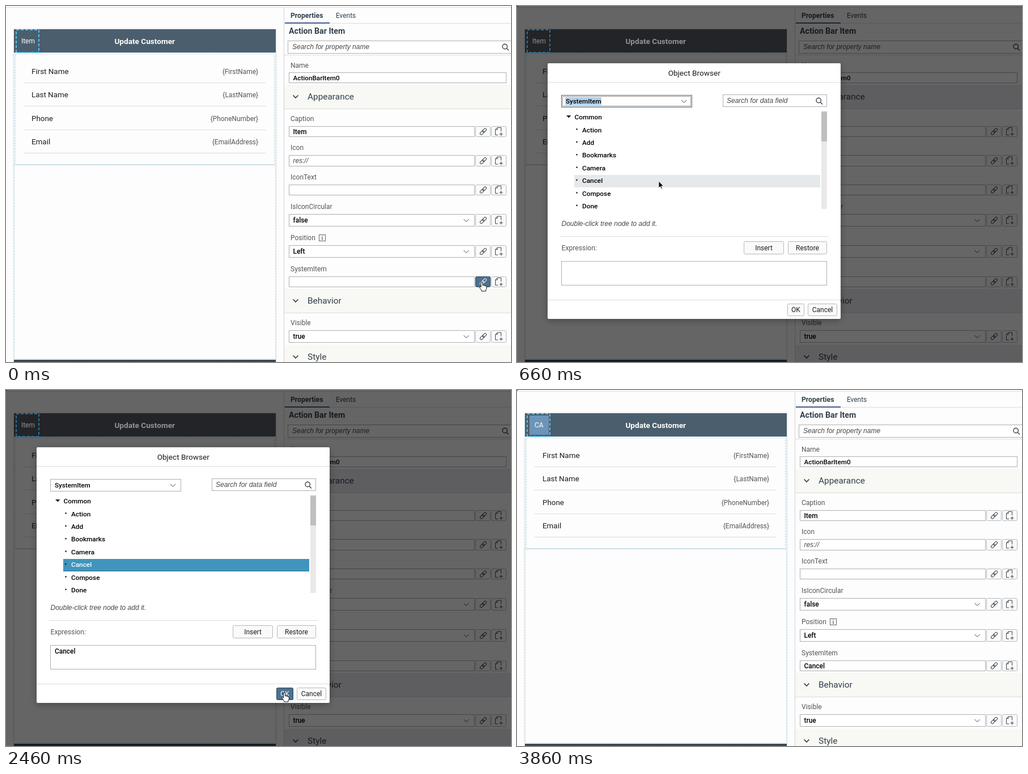
Write an HTML page that moves like this. It is 891 by 628 pixels and loops after 4.26 s.

```html
<!DOCTYPE html>
<html lang="en">
<head>
<meta charset="utf-8">
<title>Object Browser</title>
<style>
  html, body { margin: 0; width: 100%; height: 100%; overflow: hidden; background: #fdfdfd; }
  svg { display: block; width: 100%; height: 100%; }
  text { font-family: Roboto, "Open Sans", sans-serif; font-size: 12px; fill: #1c1c1c; white-space: pre; }
  .label { fill: #555; }
  .value { fill: #000; font-weight: 500; }
  .title { fill: #32404b; }
  .strong { font-weight: 700; }
  .hint { font-family: "Liberation Sans", Arial, sans-serif; font-style: italic; fill: #484848; }
  .middle { text-anchor: middle; }
  .end { text-anchor: end; }
  .field { fill: #fff; stroke: #adafb1; }
  .button { fill: #fafafa; stroke: #b5b8bb; }
  .line { stroke: #dcdcdc; }
  .icon { fill: none; stroke: #3b444c; }
  .band { fill: #f8f8f4; }
  .guide { fill: none; stroke: #b7d8e5; stroke-dasharray: 3 2; }
  .bar { fill: #4a5e6d; }
  .white { fill: #fff; }
  .badge { fill: #6d94b9; }
  .marquee { fill: none; stroke: #4fc0ee; stroke-width: 2; stroke-dasharray: 5 3; }
  .dotted { fill: none; stroke: #222; stroke-dasharray: 1 1; }
  .pressed { fill: #4d7190; stroke: #2c4456; }
  .focus { fill: none; stroke: #4a6a86; }
  .dim .band { fill: #ececf0; }
  .dim .bar { fill: #232427; }
  .dim .header .white { fill: #929294; }
  .dim .badge { fill: #27427c; }
  .dim .marquee { stroke: #2a6f9a; }
</style>
</head>
<body>
<svg id="stage" viewBox="0 0 891 628" preserveAspectRatio="none">
  <defs>
    <filter id="shadow" x="-10%" y="-10%" width="120%" height="120%">
      <feDropShadow dx="0" dy="3" stdDeviation="6" flood-opacity=".3"/>
    </filter>
    <filter id="soft" x="-5%" y="-5%" width="110%" height="110%">
      <feDropShadow dx="0" dy="0" stdDeviation="1.5" flood-opacity=".2"/>
    </filter>
    <g id="link" transform="rotate(-45)">
      <rect x="-7" y="-2.2" width="8" height="4.4" rx="2.2"/>
      <rect x="-1" y="-2.2" width="8" height="4.4" rx="2.2"/>
    </g>
    <path id="page" d="M-1 6.5H-5.5V-3L-2-6.5H4.5V0M-5.5-3H-2V-6.5M4.5 2V8M1.5 5H7.5"/>
    <path id="down" d="M-4.5-2L0 2.5 4.5-2"/>
    <path id="glass" d="M3.4-1A4.2 4.2 0 1 1-5-1 4.2 4.2 0 0 1 3.4-1ZM2.2 2.2L6 6"/>
  </defs>
</svg>
<script>
const LOOP = 4260;
const stage = document.getElementById('stage');

const rect = (x, y, w, h, attrs = '') => `<rect x="${x}" y="${y}" width="${w}" height="${h}" ${attrs}/>`;
const text = (x, y, s, size = 12, cls = '') => `<text x="${x}" y="${y}" style="font-size:${size}px" class="${cls}">${s}</text>`;
const line = (x1, y1, x2, y2, attrs = 'class="line"') => `<path d="M${x1} ${y1}L${x2} ${y2}" ${attrs}/>`;
const icon = (name, x, y, style = '') => `<g class="icon" transform="translate(${x} ${y})" style="${style}"><use href="#${name}"/></g>`;
const group = (id, body) => `<g id="${id}">${body}</g>`;
const button = (x, y, w, h, label = '') =>
  rect(x, y, w, h, 'rx="2" class="button"') + text(x + w / 2, y + h / 2 + 4.2, label, 12, 'middle');

function preview() {
  const rows = [['First Name', 'FirstName'], ['Last Name', 'LastName'], ['Phone', 'PhoneNumber'], ['Email', 'EmailAddress']];
  return rect(14, 41, 462, 600, 'fill="#fdfdfd" filter="url(#soft)"') +
    rect(14.5, 82.5, 461, 540, 'class="guide"') +
    rect(16.5, 84.5, 457, 195, 'class="guide"') +
    line(14, 280.5, 475, 280.5, 'stroke="#c9d6da"') +
    rows.map(([label, value], i) => {
      const y = 120 + i * 41.4;
      const rule = Math.round(y + 15) + .5;
      return text(45, y, label, 13.4) +
        text(445, y - .2, `{${value}}`, 11.9, 'label end') +
        line(31, rule, 458, rule);
    }).join('') +
    rect(14, 624, 462, 4, 'fill="#3a4855"');
}

function section(title, y, h) {
  return rect(491, y, 400, h, 'class="band"') + line(491, y + h + .5, 891, y + h + .5) +
    icon('down', 511, y + 20.5, 'stroke:#2f4351;stroke-width:1.7') +
    text(532, y + 26, title, 15.4, 'title');
}

function property(label, top, h, value, isList) {
  const mid = top + h / 2;
  return text(502, top - 8.8, label, 12, 'label') +
    rect(499.5, top + .5, 327, h - 1, 'class="field"') +
    text(506.5, mid + 4.2, value, 11.9, value === 'res://' ? 'hint' : 'value') +
    (isList ? icon('down', 812, mid) : '') +
    button(828.5, top + .5, 26, h - 1) + icon('link', 842, mid) +
    button(856.5, top + .5, 26, h - 1) + icon('page', 869, mid - .5);
}

function inspector() {
  return rect(490, 3, 401, 625, 'fill="#fdfdfd"') + line(490.5, 3, 490.5, 628, 'stroke="#cfd2d6"') +
    line(0, 2.5, 891, 2.5, 'stroke="#dfe0e6"') +
    text(502, 20.8, 'Properties', 12.2, 'title strong') +
    text(582, 20.8, 'Events', 11.9, 'title') +
    line(491, 30.5, 891, 30.5) + rect(492, 29, 79, 2, 'fill="#44598f"') +
    text(499, 49.3, 'Action Bar Item', 14.2, 'title strong') +
    rect(497.5, 61.5, 400, 22, 'class="field"') +
    text(505, 76, 'Search for property name', 12, 'hint') +
    icon('glass', 881, 72.5, 'stroke-width:1.4') + line(491, 86.5, 891, 86.5) +
    text(502, 108.5, 'Name', 12, 'label') +
    rect(499.5, 117.5, 383, 18, 'class="field"') + text(506.5, 131, 'ActionBarItem0', 11.7, 'value') +
    section('Appearance', 139, 42) +
    property('Caption', 212, 19, 'Item') +
    property('Icon', 263, 20, 'res://') +
    property('IconText', 315, 19, '') +
    property('IsIconCircular', 367, 22, 'false', true) +
    property('Position', 422, 22, 'Left', true) +
    rect(552.5, 403.5, 11, 11, 'fill="none" stroke="#666"') +
    text(558, 412.8, 'i', 10, 'middle') +
    property('SystemItem', 477, 19, '') +
    group('sysValue', text(506.5, 490.9, 'Cancel', 11.9, 'value')) +
    group('linkDown', rect(828.5, 477.5, 26, 18, 'rx="2" class="pressed"') +
      icon('link', 842, 486.5, 'stroke:#e8eef3')) +
    group('linkFocus', rect(830.5, 479.5, 23, 15, 'class="dotted"')) +
    section('Behavior', 499, 42) +
    property('Visible', 572, 22, 'true', true) +
    section('Style', 598, 42);
}

function header() {
  return '<g class="header">' + rect(14, 41, 462, 41, 'class="bar"') +
    text(244.7, 66.5, 'Update Customer', 13.6, 'white strong middle') +
    group('itemText', text(27, 66.4, 'Item', 11.9, 'white')) +
    group('itemBadge', rect(22, 45, 34, 34, 'class="badge"') + text(38.7, 66.4, 'CA', 12, 'white middle')) +
    rect(18, 42, 40, 40, 'class="marquee"') + '</g>';
}

function dialog() {
  const nodes = ['Action', 'Add', 'Bookmarks', 'Camera', 'Cancel', 'Compose', 'Done'];
  const rowY = i => 200 + i * 22.4;
  return rect(54, 101, 517, 451, 'rx="2" fill="#fff" filter="url(#shadow)"') +
    text(312.7, 123, 'Object Browser', 13.6, 'middle') + line(54, 134.5, 571, 134.5) +
    rect(78.5, 157.5, 230, 21, 'class="field"') +
    group('listFocus', rect(78.5, 157.5, 230, 21, 'class="focus"') +
      rect(80.5, 159.5, 226, 17, 'class="dotted"') + rect(85, 161, 64, 14, 'fill="#b2d2ee"')) +
    text(86, 172.4, 'SystemItem', 11.7, 'value') + icon('down', 294.5, 168) +
    rect(363.5, 156.5, 183, 21, 'class="field"') +
    text(370, 171.4, 'Search for data field', 12, 'hint') +
    icon('glass', 533, 167.5, 'stroke-width:1.4') +
    group('hover', rect(101, 298, 434, 22, 'fill="#e5e9ec"')) +
    group('selected', rect(101, 298, 434, 22, 'fill="#4195bd"') + rect(101, 319, 434, 1, 'fill="#2e7298"')) +
    '<path d="M87 193H95.5L91.2 197.5Z" fill="#222"/>' +
    text(101.5, rowY(0), 'Common', 11.8, 'value') +
    nodes.map((s, i) => {
      const y = rowY(i + 1);
      const label = text(115, y + .2, s, 11.8, 'value');
      return rect(104.3, y - 6.2, 2.4, 2.4, 'fill="#222"') + (s === 'Cancel' ? group('node', label) : label);
    }).join('') +
    rect(537, 186, 10, 172, 'fill="#e9e9e9"') + rect(537, 186, 10, 53, 'fill="#bfbfbf"') +
    text(78.5, 387.6, 'Double-click tree node to add it.', 12, 'hint') +
    line(76, 406.5, 550, 406.5) +
    text(78.5, 431.3, 'Expression:', 12.2, 'label') +
    button(400.5, 415.5, 70, 22, 'Insert') + button(478.5, 415.5, 68, 22, 'Restore') +
    rect(78.5, 450.5, 468, 42, 'class="field"') +
    group('areaFocus', rect(78.5, 450.5, 468, 42, 'class="focus"') +
      rect(80.5, 452.5, 464, 38, 'class="dotted"') + line(123.5, 455, 123.5, 467, 'stroke="#000"')) +
    group('expression', text(86, 465.3, 'Cancel', 11.9, 'value')) +
    line(54, 518.5, 571, 518.5) +
    button(477.5, 525.5, 29, 21, 'OK') + button(513.5, 525.5, 51, 21, 'Cancel') +
    group('okDown', rect(477.5, 525.5, 29, 21, 'rx="2" class="pressed"') + text(492, 540.2, 'OK', 12, 'white middle'));
}

const cursors =
  group('arrow', '<path d="M0 0V12L2.8 9.4 4.6 13.6 6.4 12.8 4.6 8.8H8.5Z" fill="#000" stroke="#fff" stroke-width=".8"/>') +
  group('hand', '<path d="M-1.5 1Q-1.5 0 0 0T1.5 1V6Q2 5.2 3 5.4T4 6.4Q5 5.7 6 6.2T6.6 7.2Q8.4 6.6 8.4 8.4V11Q8 13 7 14V16H-.5V14.5L-3.8 10Q-5 8.2-3.6 7.8T-1.5 9.2Z" fill="#fff" stroke="#111"/>') +
  group('beam', '<path d="M-3-7Q0-7 0-5Q0-7 3-7M0-5V5M-3 7Q0 7 0 5Q0 7 3 7M-1.5 2H1.5" fill="none" stroke="#111" stroke-width="1.2"/>');

stage.insertAdjacentHTML('beforeend',
  rect(0, 0, 891, 628, 'fill="#fdfdfd"') + preview() + inspector() +
  group('veil', rect(0, 0, 891, 628, 'fill="#000" opacity=".6"')) +
  header() + group('dialog', dialog()) +
  group('corner', '<path d="M0 0H2L0 1.5Z" fill="#000"/>') + cursors);

const el = {};
stage.querySelectorAll('[id]').forEach(node => el[node.id] = node);
const show = (id, on) => el[id].style.display = on ? '' : 'none';

// Pointer poses: start time, shape, x, y
const poses = [
  [0, 'hand', 839.5, 487], [60, 'hand', 837.5, 485], [260, 'arrow', 486.5, 303],
  [460, 'arrow', 390, 306], [660, 'arrow', 250, 309], [860, 'arrow', 161.5, 311],
  [1660, 'arrow', 250, 380], [1860, 'beam', 391, 494], [2060, 'arrow', 455, 525],
  [2260, 'hand', 491, 534], [2860, 'arrow', 491.5, 534], [3260, 'arrow', 399.5, 570],
  [3460, 'arrow', 258.5, 626], [3660, 'none', 0, 0]
];

function render(t) {
  const within = (a, b) => t >= a && t < b;
  const dim = within(260, 2860);
  stage.classList.toggle('dim', dim);
  show('veil', dim);
  show('dialog', within(260, 2660));
  show('corner', !(t < 30 || within(260, 300) || within(2860, 2900)));
  show('linkDown', t < 260);
  show('linkFocus', within(2860, 3860));
  show('listFocus', within(460, 1260));
  show('hover', within(460, 1260));
  show('selected', t >= 1260);
  el.node.firstChild.style.fill = t >= 1260 ? '#fff' : '';
  show('expression', t >= 1460);
  show('areaFocus', within(1460, 2460));
  show('okDown', within(2460, 2660));
  show('itemText', t < 2660);
  show('itemBadge', t >= 2660);
  show('sysValue', t >= 2660);

  const [, shape, x, y] = poses.filter(p => p[0] <= t).pop();
  for (const id of ['arrow', 'hand', 'beam']) show(id, id === shape);
  if (el[shape]) el[shape].setAttribute('transform', `translate(${x} ${y})`);
}

const start = performance.now();
function tick() {
  render((performance.now() - start) % LOOP);
  requestAnimationFrame(tick);
}
tick();
</script>
</body>
</html>
```
